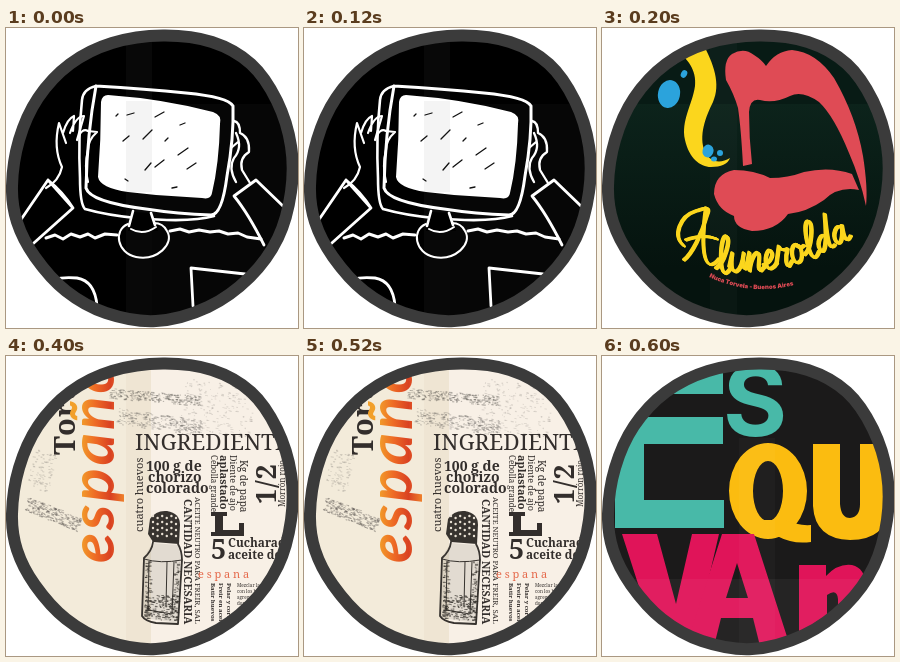
An HTML page with a canvas for the animation above (0.8 s loop, 292 by 300 pixels).

```html
<!DOCTYPE html>
<html lang="es">
<head>
<meta charset="utf-8">
<title>Posters</title>
<style>
html, body { margin: 0; width: 100%; height: 100%; overflow: hidden; background: #fff; }
canvas { display: block; width: 292px; height: 300px; }
</style>
</head>
<body>
<canvas id="stage"></canvas>
<script>
const W = 292, H = 300, HOLD = 200;
const canvas = document.getElementById('stage');
const ctx = canvas.getContext('2d');
const dpr = window.devicePixelRatio || 1;
canvas.width = W * dpr;
canvas.height = H * dpr;

const SLAB = '"Noto Serif", serif';
const HEAVY = 'Inter, Roboto, sans-serif';

// Closed smooth curve through the given points
function smooth(pts) {
  const n = pts.length, p = new Path2D(), at = i => pts[(i + n) % n];
  p.moveTo(...pts[0]);
  for (let i = 0; i < n; i++) {
    const [a, b, c, d] = [at(i - 1), at(i), at(i + 1), at(i + 2)];
    p.bezierCurveTo(b[0] + (c[0] - a[0]) / 6, b[1] + (c[1] - a[1]) / 6,
      c[0] - (d[0] - b[0]) / 6, c[1] - (d[1] - b[1]) / 6, c[0], c[1]);
  }
  p.closePath();
  return p;
}

const blob = smooth([[6, 158], [13, 112], [32, 70], [64, 36], [106, 15], [157, 7.5], [206, 14],
  [245, 36], [271, 73], [285, 118], [285, 164], [272, 210], [244, 249], [202, 279],
  [150, 293], [100, 285], [60, 263], [29, 229], [11, 194]]);

function seeded(s) {
  return () => (s = (s * 16807) % 2147483647) / 2147483647;
}

function rect(color, x, y, w, h) {
  ctx.fillStyle = color;
  ctx.fillRect(x, y, w, h);
}

function fill(color, d) {
  ctx.fillStyle = color;
  ctx.fill(new Path2D(d), 'evenodd');
}

function stroke(color, width, d) {
  ctx.strokeStyle = color;
  ctx.lineWidth = width;
  ctx.stroke(new Path2D(d));
}

function oval(color, x, y, rx, ry, rot = 0) {
  ctx.fillStyle = color;
  ctx.beginPath();
  ctx.ellipse(x, y, rx, ry, rot, 0, Math.PI * 2);
  ctx.fill();
}

function fade(x0, y0, x1, y1, ...colors) {
  const g = ctx.createLinearGradient(x0, y0, x1, y1);
  colors.forEach((c, i) => g.addColorStop(i / (colors.length - 1), c));
  return g;
}

function text(str, x, y, font, color, deg = 0, gap = 0) {
  ctx.save();
  ctx.translate(x, y);
  ctx.rotate(deg * Math.PI / 180);
  ctx.font = font;
  ctx.letterSpacing = gap + 'px';
  ctx.fillStyle = color;
  ctx.fillText(str, 0, 0);
  ctx.restore();
}

// Text on a bowl-shaped arc, turning evenly from one angle to the other
function arcText(str, x, y, font, color, from, to) {
  ctx.font = font;
  [...str].forEach((ch, i) => {
    const deg = from + (to - from) * i / (str.length - 1);
    const step = ctx.measureText(ch).width;
    text(ch, x, y, font, color, deg);
    x += step * Math.cos(deg * Math.PI / 180);
    y += step * Math.sin(deg * Math.PI / 180);
  });
}

// Dry ink: many short strokes scattered in a tilted box
function grain(rnd, x, y, w, h, deg, count, color) {
  ctx.save();
  ctx.translate(x, y);
  ctx.rotate(deg * Math.PI / 180);
  ctx.fillStyle = color;
  for (let i = 0; i < count; i++) {
    ctx.fillRect(rnd() * w, rnd() * h, 0.8 + rnd() * 2.4, 0.6 + rnd() * 0.8);
  }
  ctx.restore();
}

function monitorMan() {
  const ink = '#fff';
  rect('#000', 0, 0, W, H);
  rect('#080808', 120, 0, 26, H);
  rect('#060606', 146, 76, 146, 224);

  stroke(ink, 3, 'M90 58 Q140 61 180 65 Q222 69 227 78 Q228 110 221 148 Q216 187 205 187 Q172 186 140 181 Q84 174 80 160 Q81 106 90 58');
  stroke(ink, 2.6, 'M90 58 Q77 61 76 72 Q72 110 74 150 Q74 176 79 181 Q100 187 130 190 Q184 195 208 188');
  fill(ink, 'M102 67 Q158 71 207 84 Q216 87 214 96 Q213 136 206 165 Q205 172 196 170 L150 167 L122 164 Q94 160 92 149 Q95 112 95 74 Q96 67 102 67Z');
  rect('rgba(0,0,0,.045)', 120, 73, 26, 91);
  stroke('#111', 1.3, 'M121 87l7-2M149 89l9-5M137 111l9-9M172 127l10-7M149 139l9-7M181 141l9-6M117 113l6-5M139 142l6-7M174 97l5-2M119 151l3 2M159 113l3-3M110 88l2-2M166 160l5-1');

  fill('#000', 'M126 184 L122 203 L152 203 L146 185Z');
  stroke(ink, 2.6, 'M127 183 L123 198 M145 185 L149 197');
  stroke(ink, 2, 'M122 196 C107 202 111 225 130 229 C151 233 169 216 161 203 Q157 195 148 195 M125 201 Q137 208 150 199');
  stroke(ink, 3, 'M40 210 l9-3 8 4 8-5 9 3 8-3 7 4 10-4 12 1 M164 203 l10-2 9 3 10-2 11 2 9-1 9 3 10-1 9 4 14 2');

  stroke(ink, 2.2, 'M40 160 Q53 153 56 139 Q47 120 53 95 L60 115 M57 105 Q61 91 68 88 L67 103 M64 105 Q70 88 78 88 L71 112 M71 112 Q76 99 82 103 L91 104 Q82 112 82 122 Q78 138 82 154');
  stroke(ink, 2.8, 'M14 193 L42 152 L67 180 L20 222 M42 152 Q57 164 67 180');
  stroke(ink, 2.3, 'M228 93 Q234 94 234 105 Q244 109 243 124 Q233 130 236 142 L244 155 M230 105 Q237 120 228 130 Q222 140 230 154 M225 120 L232 114');
  stroke(ink, 2.8, 'M278 179 L250 152 L228 168 Q242 185 258 217');
  stroke(ink, 2.8, 'M33 256 Q50 248 71 250 Q89 253 91 278');
  stroke(ink, 2.8, 'M187 278 L185 240 L239 246');
}

// Brush script: path and advance of each letter
const script = {
  l: ['M0-4C8-8 15-30 10-32C4-32 3-4 8 0C10 1 12-1 14-4', 13],
  u: ['M0-4L3-16C1-4 3 1 7 0C11-2 13-8 14-16C12-6 13 1 18-4', 17],
  n: ['M0-4L3-16L3 0C4-10 9-18 12-15C14-11 9 0 14 0L18-4', 17],
  e: ['M0-4C7-6 11-12 8-16C4-18 1-8 3-3C5 2 10-1 13-5', 13],
  r: ['M0-4L4-18C5-14 9-14 12-15C9-8 8 1 12 0L15-4', 14],
  o: ['M8-16C1-17 0-1 6 0C13 0 13-15 8-16C8-12 12-12 15-14', 14],
  d: ['M11-12C8-19 0-10 2-3C5 3 10-6 15-32C11-10 10 1 17-4', 16],
  a: ['M11-13C8-19 0-10 2-3C5 3 10-6 12-15C10-4 11 2 17-4', 16]
};

function brush(color, d) {
  for (let i = -2; i <= 2; i++) {
    ctx.save();
    ctx.translate(i * 0.5, i * 0.3);
    stroke(color, 2.1, d);
    ctx.restore();
  }
}

function lipsPoster() {
  const red = '#df4b55', yellow = '#fbd61d', blue = '#2ba3dc';
  rect(fade(0, 76, 0, 240, '#0c231b', '#05130e'), 0, 0, W, H);
  rect('#081b15', 0, 0, W, 76);
  rect('rgba(255,255,255,.02)', 108, 0, 27, H);

  fill(yellow, 'M74 22 C85 30 95 42 93 58 C90 78 79 92 83 112 C87 130 98 139 109 139 C119 139 126 136 128 130 C118 136 108 134 103 124 C96 108 104 88 111 74 C119 56 112 36 100 14Z');
  oval(blue, 67, 66, 11, 14, 0.2);
  oval(blue, 70, 29, 9, 8, -0.6);
  oval(blue, 82, 46, 3, 4, 0.5);
  oval(blue, 106, 123, 5.5, 6.5, 0.2);
  oval(blue, 118, 125, 3, 3);
  oval(blue, 112, 131, 3, 2.5);

  fill(red, 'M124 52 Q121 32 130 26 Q142 19 152 27 Q160 32 164 38 Q174 23 190 22 Q214 24 232 50 Q254 88 261 128 Q266 160 264 178 Q258 150 247 125 Q232 88 217 74 Q200 62 188 68 Q172 76 158 72 Q148 70 147 84 Q147 110 150 136 L141 138 Q139 100 136 80 Q132 66 124 52Z');
  fill(red, 'M112 166 Q112 146 132 142 Q152 142 168 150 Q186 150 202 144 Q228 138 250 146 L257 162 Q236 158 222 172 Q205 184 186 186 Q174 203 150 203 Q132 200 132 188 Q116 182 112 166Z');

  brush(yellow, 'M82 218C70 208 78 188 94 183C104 180 109 177 105 187C100 206 90 226 82 232M104 180C101 200 99 230 107 236C111 238 114 235 117 231M84 212C95 208 106 207 115 211');
  let x = 114;
  for (const ch of 'lunerolda') {
    const [d, step] = script[ch];
    const t = Math.max(-0.3, (x - 140) / 105);
    ctx.save();
    ctx.translate(x, 243 - 32 * t * Math.abs(t));
    ctx.rotate(-0.35 * Math.max(0, t));
    ctx.scale(1.04, 1.15);
    brush(yellow, d);
    ctx.restore();
    x += step * 1.02;
  }
  arcText('Nuca Torvela - Buenos Aires', 107, 249, '900 6.1px ' + HEAVY, red, 24, -14);
}

function shaker(rnd) {
  const ink = '#37332f';
  fill('rgba(70,66,60,.12)', 'M147 187 L172 189 L176 203 L173 267 L137 262 L137 202Z');
  stroke(ink, 1.8, 'M147 186 Q146 195 138 202 L136 260 Q139 265 150 267 L172 268 L176 204 Q176 195 172 188');
  stroke(ink, 1, 'M143 206 L142 254 L166 258 L168 206 M138 203 Q154 208 176 204 M161 206 L160 250');
  grain(rnd, 139, 238, 33, 25, 3, 170, 'rgba(45,42,38,.65)');
  grain(rnd, 139, 204, 6, 56, 1, 70, 'rgba(45,42,38,.6)');
  grain(rnd, 168, 204, 5, 60, 2, 70, 'rgba(45,42,38,.6)');
  fill(ink, 'M142 178 L144 163 Q150 154 161 155 Q174 157 174 169 L173 188 L147 186Z');
  for (let i = 0; i < 24; i++) {
    oval('#e9e1d4', 147 + (i % 6) * 4.6, 160 + Math.floor(i / 6) * 6 + (i % 2) * 2, 1.2, 1.3);
  }
}

function recipePoster() {
  const ink = '#332e2c', rnd = seeded(41);
  rect('#f3ebda', 0, 0, W, H);
  rect('#f8f0e6', 145, 0, 147, H);
  rect('rgba(160,140,110,.06)', 120, 0, 25, H);

  grain(rnd, 104, 32, 90, 10, 5, 260, 'rgba(85,82,78,.38)');
  grain(rnd, 112, 52, 84, 16, 8, 280, 'rgba(90,87,82,.33)');
  grain(rnd, 180, 22, 70, 50, 8, 200, 'rgba(110,106,100,.22)');
  grain(rnd, 22, 140, 58, 14, 22, 260, 'rgba(80,77,72,.36)');
  grain(rnd, 28, 92, 22, 40, 10, 90, 'rgba(110,106,100,.25)');

  text('Tortilla', 69, 99, '600 29px ' + SLAB, ink, -90, 1);
  text('española', 108, 207, 'italic 700 62px Lato, sans-serif',
    fade(0, -34, 0, 12, '#f2a02b', '#ee6b25', '#d94122', '#f28a2c'), -90, 3);

  text('INGREDIENTES', 129, 94, '500 22.5px ' + SLAB, ink);
  text('100 g de', 140, 115, '600 14px ' + SLAB, ink);
  text('chorizo', 142, 126, '600 14px ' + SLAB, ink);
  text('colorado', 140, 137, '600 14px ' + SLAB, ink);
  text('cuatro huevos', 137, 176, '500 11px ' + SLAB, ink, -90);

  text('ACEITE NEUTRO PARA FREIR, SAL', 189, 141, '500 7.8px ' + SLAB, ink, 90);
  text('CANTIDAD NECESARIA', 178, 143, '600 10.7px ' + SLAB, ink, 90);
  text('Kg de papa', 234, 104, '500 10px ' + SLAB, ink, 90);
  text('Diente de ajo', 224, 99, '500 9px ' + SLAB, ink, 90);
  text('aplastado', 214, 99, '600 11px ' + SLAB, ink, 90);
  text('Cebolla grande', 205, 99, '500 8px ' + SLAB, ink, 90);
  text('1/2', 270, 148, '600 27px ' + SLAB, ink, -90, 1);
  text('Morrón rojo', 279, 151, '500 8px ' + SLAB, ink, -90);

  fill(ink, 'M205 156 H221 V160 H217 V174 H233 V167 H238 V180 H205 V176 H209 V160 H205Z');
  text('5', 205, 203, '600 27px ' + SLAB, ink);
  text('Cucharadas', 222, 191, '600 11.8px ' + SLAB, ink);
  text('aceite de oliva', 222, 203, '600 11.8px ' + SLAB, ink);
  text('espana', 192, 222, '500 11px ' + SLAB, '#e5694b', 0, 2.8);

  ['Pelar y cortar', 'Freir en aceite', 'Batir huevos'].forEach((s, i) =>
    text(s, 221 - i * 8, 227, '600 6px ' + SLAB, ink, 90));
  ['Mezclar las papas', 'con los huevos y', 'agregar chorizo,', 'dorar los lados'].forEach((s, i) =>
    text(s, 231, 231 + i * 6, '500 4.6px ' + SLAB, ink));
  shaker(rnd);
}

function lettersPoster() {
  const teal = '#48b9a8', amber = '#fbbc10', pink = '#e01459';
  rect('#1b1a1a', 0, 0, W, H);
  fill(teal, 'M13 12 H121 V38 H42 V61 H121 V88 H42 V144 H122 V172 H13Z');
  text('S', 121, 80, '700 98px ' + HEAVY, teal);
  fill(amber, 'M166 87 A39 48 0 0 1 166 183 A39 48 0 0 1 166 87Z M166 105 A15 30 0 0 0 166 165 A15 30 0 0 0 166 105Z');
  fill(amber, 'M160 164 H184 Q196 170 209 169 V186 Q176 190 160 164Z');
  fill(amber, 'M211 88 H238 V148 Q239 162 248 162 Q258 161 258 148 V88 H287 V150 Q285 184 248 184 Q213 183 211 150Z');
  fill(pink, 'M20 178 H55 L74 248 L90 178 H117 L91 290 H56Z');
  fill(pink, 'M120 178 H152 L188 290 H158 L151 262 H119 L112 290 H84Z M135 207 L124 242 H146Z');
  fill(pink, 'M197 209 H224 V220 Q236 207 250 209 Q263 212 264 230 V287 H236 V243 Q235 232 225 239 V287 H197Z');
  rect('rgba(255,255,255,.045)', 0, 223, W, 77);
  rect('rgba(255,255,255,.025)', 137, 82, 36, 218);
}

const scenes = [monitorMan, lipsPoster, recipePoster, lettersPoster];

function draw() {
  const i = Math.floor(performance.now() / HOLD) % scenes.length;
  ctx.setTransform(dpr, 0, 0, dpr, 0, 0);
  ctx.lineCap = ctx.lineJoin = 'round';
  rect('#fff', 0, 0, W, H);
  ctx.save();
  ctx.clip(blob);
  scenes[i]();
  ctx.restore();
  ctx.strokeStyle = '#3b3b3b';
  ctx.lineWidth = 12;
  ctx.stroke(blob);
  requestAnimationFrame(draw);
}
draw();
</script>
</body>
</html>
```
